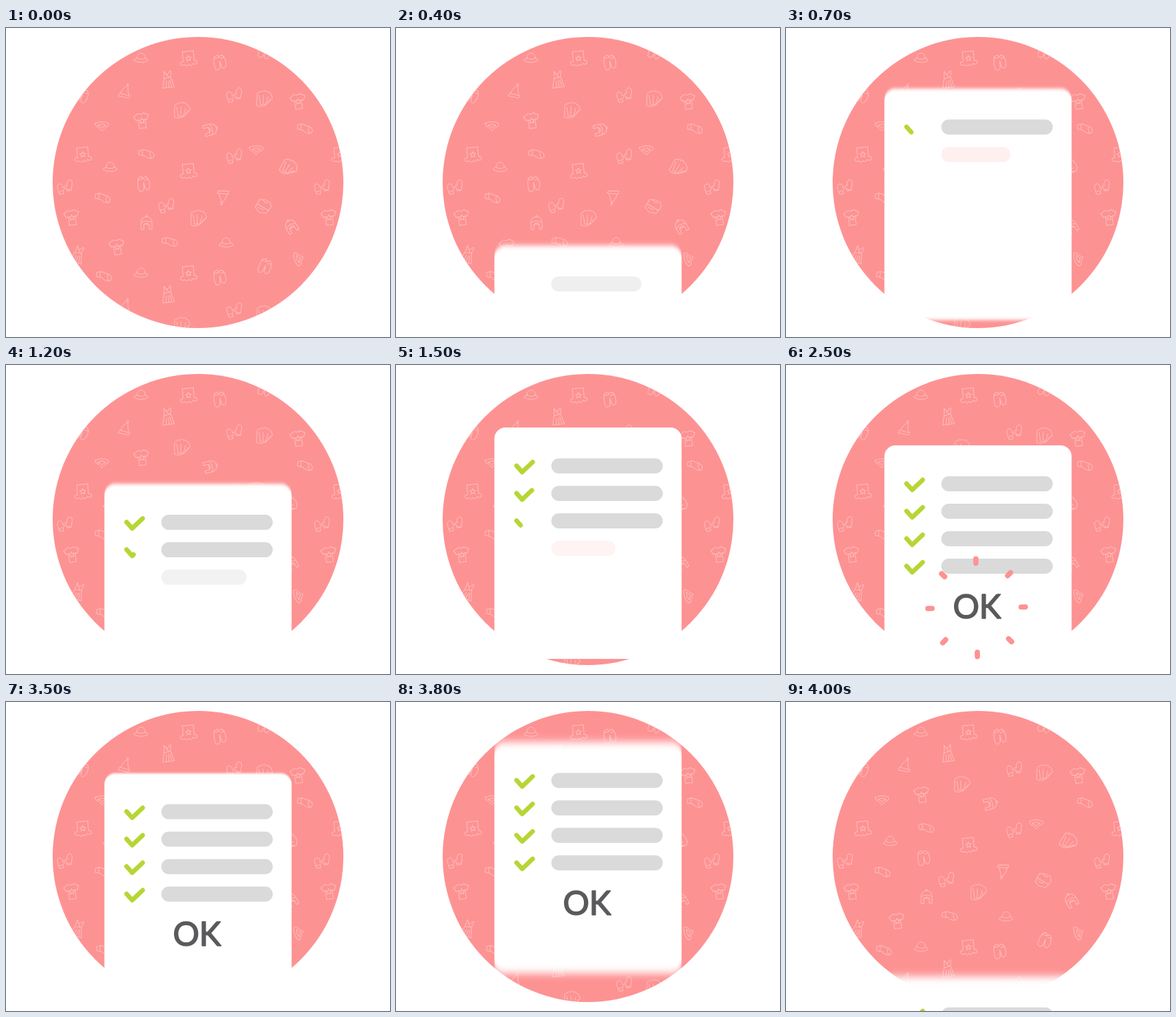
An HTML page that plays this animation: 560 px wide and 450 px high, repeating every 4100 ms.

```html
<!DOCTYPE html>
<html lang="en">
<head>
<meta charset="utf-8">
<title>Checklist</title>
<style>
  html, body { margin: 0; width: 100%; height: 100%; overflow: hidden; background: #fff; }
  svg { display: block; }
  #pattern { fill: none; stroke: #fdbdba; stroke-width: 1; stroke-linejoin: round; stroke-linecap: round; }
  .check { fill: none; stroke: #b6d635; stroke-width: 6.6; stroke-linecap: round; stroke-linejoin: round; }
  .spoke { stroke: #fd9293; stroke-width: 7.6; stroke-linecap: round; }
  #ok { font: 400 48px Lato, sans-serif; fill: #5a5a5c; stroke: #5a5a5c; stroke-width: 1.6; stroke-linejoin: round; text-anchor: middle; }
</style>
</head>
<body>
<svg width="560" height="450" viewBox="0 0 560 450">
  <defs>
    <clipPath id="disc"><circle cx="280" cy="225" r="212"/></clipPath>
    <filter id="blur" filterUnits="userSpaceOnUse" x="100" y="-60" width="360" height="480">
      <feGaussianBlur id="smear" stdDeviation="0 0"/>
    </filter>
  </defs>
  <circle cx="280" cy="225" r="212" fill="#fd9293"/>
  <g clip-path="url(#disc)"><g id="pattern"></g></g>
  <g id="card">
    <rect x="143.5" width="273" height="337" rx="16" fill="#fff" filter="url(#blur)"/>
    <g id="rows"></g>
    <g id="okBox"><text id="ok" y="15.2">OK</text></g>
    <g id="spokes"></g>
  </g>
</svg>
<script>
const $ = id => document.getElementById(id);
function add(parent, tag, attrs) {
  const el = document.createElementNS('http://www.w3.org/2000/svg', tag);
  set(el, attrs);
  return parent.appendChild(el);
}
function set(el, attrs) {
  for (const k in attrs) el.setAttribute(k, attrs[k]);
}
const clamp = p => Math.max(0, Math.min(1, p));
const smooth = p => (p = clamp(p), p * p * (3 - 2 * p));

// Clothes pattern
const star = 'M0-4l1.2 2.6 2.8.3-2 2 .6 2.8-2.6-1.4-2.6 1.4.6-2.8-2-2 2.8-.3z';
const icons = {
  hat: 'M-10 4c4 4 16 4 20 0c0-2-3-3-4-3c0-10-12-10-12 0c-1 0-4 1-4 3zM-6 1c3 2 9 2 12 0',
  topHat: 'M-8-10L8-10 8 4q5 0 4 4q-3 3-6 0q-3 5-6 1q-3 4-6 0q-4 2-6-1q-1-4 4-4z' + star,
  gloves: 'M-6-9l5-2 2 3 4-2 3 3q3 8 0 15q-4 4-6-2l-1-8-1 10q-4 5-7 1q-2-8 1-18zM-6-7l7 0M3-5l5-1',
  dress: 'M-5-12l3 4q3 1 5-4l2 0-1 8 5 15-17 1 3-16zM-5-1l9-3M-3 11l1-9M1 11v-9M5 10l-2-9M-2-8l4 6',
  santa: 'M-9 6l15 3 2-3-15-4zM-6 2q4-9 11-11q-1 6 1 14M5-9a1.5 1.5 0 1 1 1-1',
  mittens: 'M-8 10l-2-6q-3-8 2-9q5 0 5 6l2-1q2 2-2 5l1 4zM-9 7l5-2M3 5l-1-4-2-2q0-3 3-1q-1-8 4-9q5 1 3 9l-1 6zM3 3l6 1',
  tutu: 'M-10-6q0-4 4-3q1-4 4-1q3-4 5 0q4-2 5 2q4 0 3 4q3 2 1 4l-9 9q-7 4-13 1zM-5 7l-2-12M-1 8l0-13M3 8l3-11M6 5l4-5M-6 8q6 2 10-1',
  shirt: 'M-4-11q4 3 8 0l7 4-3 6-3-1v13h-10v-13l-3 1-3-6z' + star,
  bib: 'M-10-4q10-5 20 0q0 4-3 5q-2 0-7 6q-5-6-7-6q-3-1-3-5zM-6-1q6-4 12 0q-4 0-6 4q-2-4-6-4',
  sock: 'M-11-5l6-2 7 2q8 1 9 6q0 5-5 5q-6-1-9-4l-8-1zM-6-6v7M5-3q-1 4 2 8',
  bonnet: 'M-8 9v-9q0-9 8-9t8 9v9h-4v-7h-8v7zM-4 2q4-4 8 0M-1-9a1.3 1.3 0 1 1 2 0M-7-1q7-4 14 0',
  sweater: 'M-9-7l7-3 9 0 4 6-3 11-10 3-8-4zM-10 0l20 2M-4-9q3 4 8 1M-6 4h8'
};
// x, y, turn for each piece of one tile
const places = {
  hat: [197, 43, 0, 152, 202, 0, 321, 312, 0],
  topHat: [266, 44, -5, 112, 184, -5, 266, 208, -5],
  gloves: [311, 50, -10, 200, 227, -8, 377, 347, 20, 110, 98, 25],
  dress: [236, 75, -3, 105, 330, 20],
  santa: [173, 93, 0, 317, 245, 170],
  mittens: [333, 98, 0, 333, 187, 0, 234, 259, 0, 86, 232, 0],
  tutu: [256, 120, 0, 376, 103, 0, 280, 277, 0, 412, 203, 30],
  shirt: [198, 135, -8, 426, 107, -8, 96, 276, -8, 162, 319, -8],
  bib: [140, 143, 0, 365, 178, 0, 427, 336, -110],
  sock: [436, 147, 5, 205, 184, 0, 141, 248, 5, 239, 312, 0, 143, 362, 5],
  bonnet: [298, 148, 75, 205, 284, 0, 416, 289, -30],
  sweater: [375, 260, 25]
};
for (const name in places) {
  const list = places[name];
  for (let i = 0; i < list.length; i += 3)
    for (const dx of [-375, 0, 375])
      for (const dy of [-313, 0, 313]) {
        const x = list[i] + dx, y = list[i + 1] + dy;
        if (Math.hypot(x - 280, y - 225) < 226)
          add($('pattern'), 'path', { d: icons[name], transform: `translate(${x} ${y}) rotate(${list[i + 2]})` });
      }
}

// Card contents, relative to its top edge
const rows = [0, 1, 2, 3].map(i => {
  const y = 45 + 40 * i;
  return {
    bar: add($('rows'), 'rect', { x: 226.5, y, height: 22, rx: 11 }),
    check: add($('rows'), 'path', { class: 'check', d: `M175.8 ${y + 10.7}l8.2 9.2 15.3-14.6`, pathLength: 1 }),
    start: 413 * i - 85
  };
});
const spokes = [...Array(8)].map((_, i) =>
  add($('spokes'), 'line', { class: 'spoke', transform: `translate(278 236.5) rotate(${45 * i - 0.9})` }));

// Top edge of the card: time, y
const keys = [[133, 445], [833, 51], [1100, 205], [1400, 82], [1700, 117], [3433, 117], [3733, 13], [4067, 445]];
function cardTop(t) {
  let y = keys[0][1];
  for (let i = 1; i < keys.length; i++) {
    const [t0, y0] = keys[i - 1], [t1, y1] = keys[i];
    if (t >= t0) y = y0 + (y1 - y0) * smooth((t - t0) / (t1 - t0));
  }
  return y;
}

function draw(t) {
  const top = cardTop(t);
  const speed = Math.abs(cardTop(t + 1) - cardTop(t - 1)) / 2;
  set($('card'), { transform: `translate(0 ${top})` });
  set($('smear'), { stdDeviation: `0 ${speed < 0.02 ? 0 : speed * 4.8}` });

  for (const { bar, check, start } of rows) {
    const p = clamp((t - start) / 600), q = clamp((t - start - 600) / 600);
    set(bar, {
      width: 22 + 140.5 * clamp((p * 162.5 - 22) / 140.5),
      fill: p < 0.7 ? '#fd9293' : '#dadada',
      opacity: p ** 4
    });
    set(check, { 'stroke-dasharray': `${q} 2`, visibility: q > 0 ? 'visible' : 'hidden' });
  }

  const grow = smooth((t - 1830) / 570);
  set($('okBox'), { transform: `translate(278.5 236.5) scale(${grow})`, visibility: grow > 0 ? 'visible' : 'hidden' });

  const out = smooth((t - 1830) / 670);
  const r = 40 + 28 * out + clamp((t - 2500) / 100);
  const half = 1.4 + 1.7 * out;
  set($('spokes'), { opacity: clamp((t - 1830) / 270) * clamp((2900 - t) / 400) });
  for (const s of spokes) set(s, { y1: -r - half, y2: -r + half });
}

function tick() {
  draw(Math.floor(performance.now() % 4100 / 100) * 100);
  requestAnimationFrame(tick);
}
tick();
</script>
</body>
</html>
```
